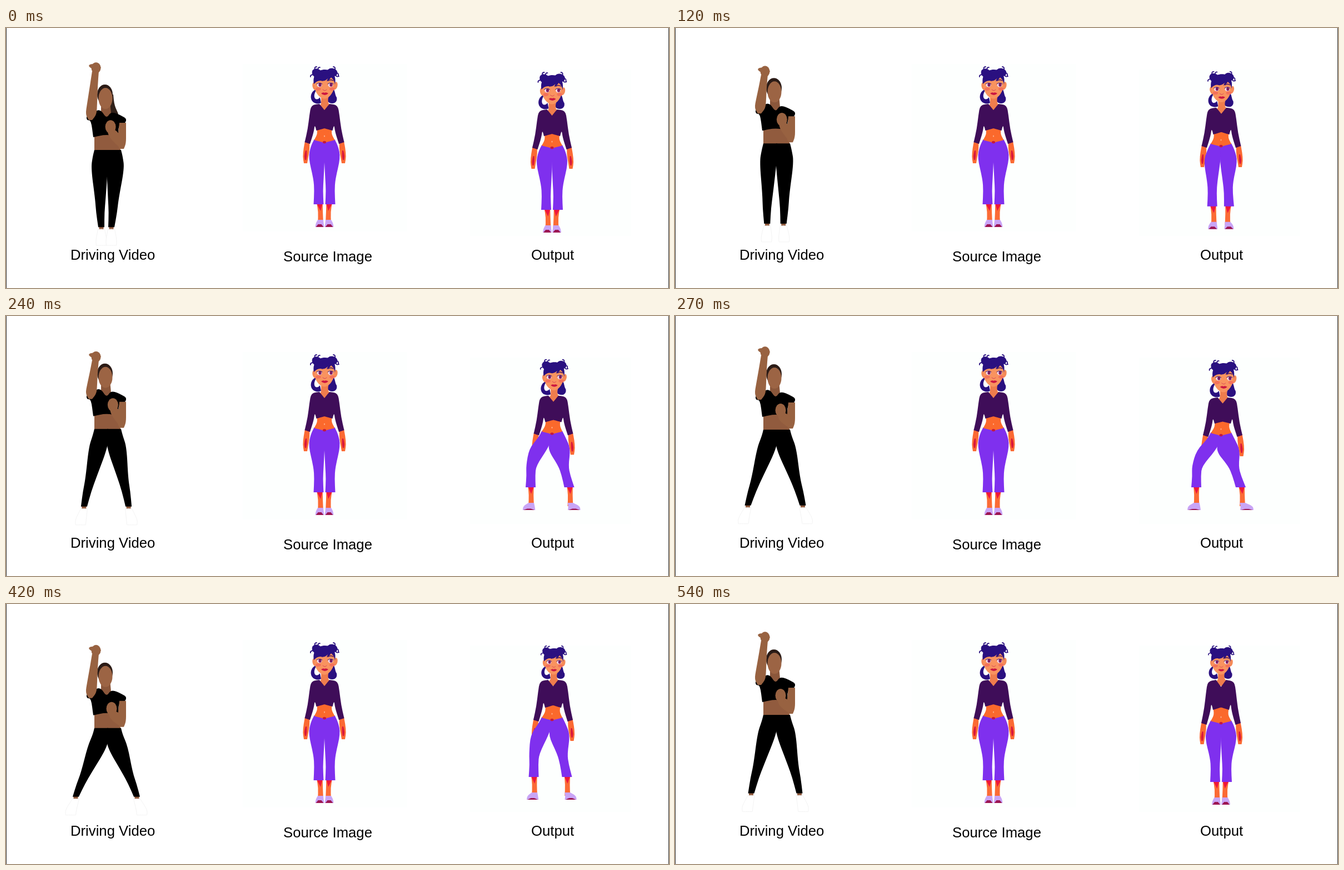
Write an HTML page with a canvas that moves like this. It is 1193x469 px and loops after 570 ms.

```html
<!DOCTYPE html>
<html lang="en">
<head>
<meta charset="utf-8">
<title>Motion transfer</title>
<style>
html, body { margin: 0; width: 100%; height: 100%; overflow: hidden; background: #fff; }
canvas, svg { position: absolute; left: 0; top: 0; }
text { font: 25.7px "Liberation Sans", Arial, sans-serif; }
</style>
</head>
<body>
<canvas id="stage" width="1193" height="469"></canvas>
<svg width="1193" height="469">
  <text x="116" y="418">Driving Video</text>
  <text x="499" y="420.5">Source Image</text>
  <text x="945" y="418">Output</text>
</svg>
<script>
const ctx = document.getElementById('stage').getContext('2d');
const LOOP = 570;
const STEPS = [0, 30, 60, 90, 120, 180, 240, 270, 330, 360, 390, 450, 480, 510, 540];

// Each move is a key time with the few values that drive a whole body.
const KEYS = [0, 90, 180, 270, 360, 480, 540];
const DANCER = {
  bob: [8, 0, -11, -7, 10, 17, -12],
  guard: [-.27, 0, 1, 0, 0, 0, 0],
  spread: [0, .05, .27, .88, 1, 1, .75],
};
const GIRL = {
  chest: [10, 10, 0, 10, 0, 0, 0],
  hip: [10, 10, 1, 9, 1, 9, 9],
  feet: [10, 10, -9, -9, -9, 3, 3],
  stride: [0, 0, .47, 1, .88, 0, 0],
};
const STILL = { chest: 0, hip: 0, feet: 0, stride: 0, headSize: 1 };

const mix = (a, b, k) => a + (b - a) * k;
const mixAll = (a, b, k) => a.map((v, i) => mix(v, b[i], k));

function poseAt(tracks, t) {
  const i = KEYS.findLastIndex(k => k <= t);
  const j = Math.min(i + 1, KEYS.length - 1);
  const k = (t - KEYS[i]) / (KEYS[j] - KEYS[i] || 1);
  return Object.fromEntries(Object.entries(tracks).map(([name, v]) => [name, mix(v[i], v[j], k)]));
}

// Closed soft outline through [x, y] points; a doubled point makes a corner.
function shape(fill, points) {
  const last = points[points.length - 1];
  ctx.beginPath();
  ctx.moveTo(...mixAll(last, points[0], .5));
  points.forEach((p, i) => {
    ctx.quadraticCurveTo(...p, ...mixAll(p, points[(i + 1) % points.length], .5));
  });
  ctx.closePath();
  ctx.fillStyle = fill;
  ctx.fill();
}

// Tapered limb through [x, y, half width] joints with flat ends.
function limb(fill, ...joints) {
  const path = [joints[0], ...joints, joints[joints.length - 1]];
  shape(fill, [
    ...path.map(([x, y, w]) => [x - w, y]),
    ...path.map(([x, y, w]) => [x + w, y]).reverse(),
  ]);
}

// Full outline from its right half, listed from top to bottom.
const mirror = half => [...half, ...half.map(([x, y]) => [-x, y]).reverse()];

function oval(fill, x, y, rx, ry, turn = 0) {
  ctx.beginPath();
  ctx.ellipse(x, y, rx, ry, turn, 0, 7);
  ctx.fillStyle = fill;
  ctx.fill();
}

function line(color, width, d) {
  ctx.strokeStyle = color;
  ctx.lineWidth = width;
  ctx.stroke(new Path2D(d));
}

function fillPath(color, d) {
  ctx.fillStyle = color;
  ctx.fill(new Path2D(d));
}

function dancerLeg(side, waist, bob, spread) {
  const ankle = [180.5 + side * (9 + 46 * spread), 356 + .4 * bob - 13 * spread];
  const outer = 183 + side * (30 + 6 * spread), inner = 182 - side;
  const hip = [(outer + inner) / 2, waist + 33];
  const [kx, ky] = mixAll(hip, ankle, .52);
  const [cx, cy] = mixAll(hip, ankle, .75);
  const [ax, ay] = ankle;
  limb('#935d40', [ax, ay - 3, 4], [ax, ay + 5, 4]);
  limb('#000', [183 + side * 11.5, waist, 12.5], [183 + side * 13, waist + 12, 14],
    [...hip, Math.abs(outer - inner) / 2], [kx, ky, 9.5], [cx + side, cy, 7.5], [ax, ay, 5.5]);
  const toe = ax + side * 9 * spread;
  limb('#fff', [ax, ay + 4, 6], [toe, ay + 24, 10], [toe, ay + 33, 9]);
  ctx.strokeStyle = '#f3f3f3';
  ctx.lineWidth = 1;
  ctx.stroke();
}

function drawDancer({ bob, guard, spread }) {
  const skin = '#986241', waist = 212;
  limb('#915b3e', [181, 180 + bob, 22], [181, 198 + bob, 22], [183, waist + 4 + bob, 24]);
  for (const side of [-1, 1]) dancerLeg(side, waist + bob, bob, spread);

  ctx.save();
  ctx.translate(0, bob);
  if (guard < 0) limb('#302019', [189, 112, 4], [191, 132, 4], [196, 150, 8], [197, 158, 3]);
  limb('#8b573b', [179, 126, 8], [180, 144, 9], [180, 156, 9]);
  oval('#2b1b16', 178, 112, 14, 18);
  oval('#9c6444', 179, 119, 12.5, 19);
  shape('#000', [[144, 151], [146, 159], [153, 158], [157, 189], [157, 189], [180, 184], [203, 188], [203, 188],
    [202, 168], [211, 168], [218, 157], [210, 151], [189, 142], [181, 156], [170, 138], [157, 144]]);

  const drop = 30 * guard;
  limb(skin, [161, 78 + drop, 6], [158, 102 + drop * .7, 7], [155, 130 + drop * .2, 9], [153, 148, 10], [152, 158, 3]);
  oval(skin, 162, 72 + drop, 8.5, 10);
  oval(skin, 160, 70 + drop, 11, 4.5, .2);

  const fistX = 190 + 7 * guard, fistY = 177 - 25 * Math.abs(guard);
  limb(skin, [210, 163, 6], [209, 182, 7], [208, 200, 8], [208, 210, 4]);
  shape(skin, [[208, 190], [214, 205], [208, 211], [fistX - 3, fistY + 19], [fistX - 6, fistY + 5], [fistX + 9, fistY + 4]]);
  oval(skin, fistX, fistY, 9.5, 12);
  ctx.restore();
}

function girlHead() {
  const hair = '#2a1080';
  fillPath('#ef7d4d', 'M-6 118H7V135Q9 139 12 141Q1 160 -10 141Q-6 139 -6 134Z');
  fillPath(hair, 'M11 106C20 108 18 120 22 125C24 134 17 138 9 135C4 133 8 125 8 118Z');
  fillPath(hair, 'M-13 110C-26 113 -28 130 -18 135Q-12 138 -6 135L-8 125Q-13 131 -17 127C-20 122 -17 115 -13 110Z');
  oval('#f48a58', -18, 105, 3.5, 7, -.2);
  oval('#f48a58', 20, 104, 3.5, 7, .2);
  fillPath('#f9935f', 'M-18 88C-20 107 -16 119 -7 125Q0 130 7 125C16 118 20 106 18 88Z');
  for (const x of [-9, 11]) {
    oval('#f4725b', x * 1.25, 110, 5, 3);
    oval('#f2d9ee', x, 102.5, 4.5, 4);
    oval('#7d1c62', x + 1, 102.5, 2.6, 3.3);
    line('#37105f', 1, `M${x - 5} 101Q${x} 97 ${x + 5} 101`);
    line('#37105f', 1.4, `M${x - 4} 95Q${x} 92 ${x + 5} 95`);
  }
  line('#d9465a', 1, 'M-3 111Q1 115 4 111');
  fillPath('#cc1740', 'M-6 118Q-2 115 0 117Q3 115 7 118Q1 124 -6 118Z');
  fillPath(hair, 'M-19 101C-22 84 -12 75 1 75C15 75 22 86 19 102Q18 94 12 89Q8 95 4 96L6 91Q0 97 -6 95Q-13 94 -19 101Z');
  oval(hair, -13, 82, 10, 8, .6);
  oval(hair, 14, 80, 9.5, 7.5, .2);
  line(hair, 1.8, 'M-17 76Q-19 70 -14 70M-12 75Q-11 70 -8 71M-21 84Q-26 85 -25 88M19 75Q20 70 16 70M21 81Q26 81 25 86M20 85Q22 89 26 87');
}

function girlLeg(side, { hip, feet, stride }) {
  const [kneeOut, cuffOut, footOut] = side < 0 ? [-33, -34, -40] : [12, 25, 38];
  const crotch = -10 * stride, outer = side * 28.5 + kneeOut * stride * .45;
  const knee = [side * 10.5 + kneeOut * stride, 273 + mix(hip, feet, .6)];
  const cuff = [side * 10.5 + cuffOut * stride, 318 + feet];
  const ankle = side * 7 + mix(cuffOut, footOut, .5) * stride;
  const toe = side * 8.5 + footOut * stride, width = 8 + 4 * stride;
  const sole = 359 + feet;

  limb('#fb6b35', [mix(ankle, cuff[0], .5), cuff[1] - 4, 5.5], [ankle, 332 + feet, 4], [ankle, 352 + feet, 5]);
  limb('#ee163c', [mix(ankle, cuff[0], .5), cuff[1] - 2, 5.5], [ankle, 330 + feet, 0]);
  limb('#c9a5f6', [ankle, 346 + feet, 5], [toe, 352 + feet, width - 1], [toe, sole, width]);
  limb('#9c1653', [toe, sole - 5 + 3 * stride, 3], [toe, sole, width - 1]);
  limb('#7f30ee', [side * 9, 201 + hip, 9.5], [side * 12, 213 + hip, 12.5],
    [(outer + crotch) / 2, 233 + hip, Math.abs(outer - crotch) / 2 + .5], [...knee, 9],
    [...mixAll(knee, cuff, .45), 7.8], [...cuff, 9]);
}

function drawGirl(center, pose) {
  const { chest, hip, stride, headSize = .9 + chest / 100 } = pose;
  const sway = 3 * stride;
  ctx.save();
  ctx.translate(center, 0);
  for (const side of [-1, 1]) {
    const x = side * 31 + sway;
    limb('#fb6a33', [x, 204 + hip, 4], [x + side, 217 + hip, 5.5], [x + side * 3, 232 + hip, 5], [x + side * 3, 244 + hip, 3]);
    limb('#d8163c', [x + side * 2, 221 + hip, 1], [x + side * 3, 231 + hip, 2.5], [x + side * 3, 238 + hip, 1]);
  }
  for (const side of [-1, 1]) girlLeg(side, pose);
  shape('#fb692c', mirror([[0, 176], [15, 176], [12, 190], [18.5, 202], [18.5, 202], [0, 207], [0, 207]])
    .map(([x, y]) => [x + sway * (203 - y) / 27, y + hip]));
  oval('#ffb08a', 0, 195 + hip, 1, 1.5);
  oval('#c4193f', 0, 206 + hip, 3, 2.2);

  ctx.save();
  ctx.translate(sway * 1.4, 126 + chest);
  ctx.scale(headSize, headSize);
  ctx.translate(0, -126);
  girlHead();
  ctx.restore();

  const half = [[0, 148], [9, 137], [9, 137], [24, 139], [27, 157], [30, 182], [35.5, 206], [35.5, 206],
    [26, 209], [26, 209], [19, 187], [17.5, 174], [14.5, 185], [14.5, 185], [0, 181]];
  shape('#3f0d59', mirror(half).map(([x, y]) => [x + sway, y + mix(chest, hip, (y - 137) / 72)]));
  ctx.restore();
}

function rect(fill, ...box) {
  ctx.fillStyle = fill;
  ctx.fillRect(...box);
}

function draw(t) {
  rect('#fff', 0, 0, 1193, 469);
  rect('#fdfffe', 426, 65, 296, 302);
  rect('#fdfffe', 835, 75, 290, 300);
  rect('#333', 0, 0, 1, 469);
  rect('#333', 1192, 0, 1, 469);
  drawDancer(poseAt(DANCER, t));
  drawGirl(573, STILL);
  drawGirl(982.5, poseAt(GIRL, t));
}

ctx.lineCap = 'round';
const start = performance.now();
function tick() {
  const now = (performance.now() - start) % LOOP;
  draw(STEPS.findLast(s => s <= now));
  requestAnimationFrame(tick);
}
tick();
</script>
</body>
</html>
```
